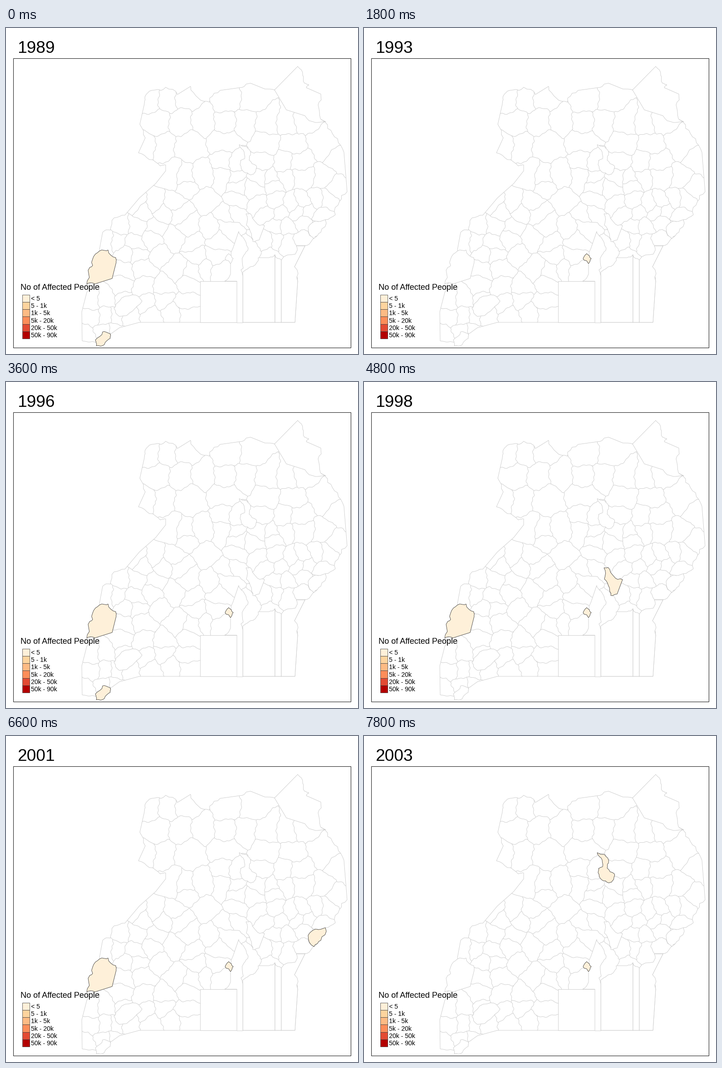
A matplotlib script that plays this animation: 776 by 721 pixels, repeating every 8000 ms.

```python
import numpy as np
import matplotlib.pyplot as plt
from itertools import combinations
from matplotlib.animation import FuncAnimation
from matplotlib.collections import LineCollection
from matplotlib.patches import Polygon, Rectangle

W, H, DPI = 776, 721, 100
PX = 72 / DPI
STEP, TICK, LOOP = 600, 200, 8000
GRAY, DARK = "#c6c6c6", "#303030"
PALETTE = ["#fef0d9", "#fdd49e", "#fdbb84", "#fc8d59", "#e34a33", "#b30000"]
LABELS = ["< 5", "5 - 1k", "1k - 5k", "5k - 20k", "20k - 50k", "50k - 90k"]
rng = np.random.default_rng(7)

plt.rcParams["font.family"] = "Liberation Sans"
fig = plt.figure(figsize=(W / DPI, H / DPI), dpi=DPI, facecolor="white")
ax = fig.add_axes([0, 0, 1, 1])
ax.set_xlim(0, W)
ax.set_ylim(H, 0)
ax.axis("off")


def crinkle(*flat, levels=2, amount=0.18):
    """Closed rough border; long or axis-aligned edges stay straight."""
    pts = np.array(flat + flat[:2], float).reshape(-1, 2)
    for _ in range(levels):
        out = [pts[0]]
        for a, b in zip(pts[:-1], pts[1:]):
            d = b - a
            if 4 < np.hypot(*d) < 34 and d.all():
                out.append((a + b) / 2 + rng.uniform(-amount, amount) * np.array([-d[1], d[0]]))
            out.append(b)
        pts = np.array(out)
    return pts


def area(*flat):
    return ax.add_patch(Polygon(crinkle(*flat), facecolor="white", edgecolor=GRAY,
                                linewidth=0.8 * PX, zorder=3))


def warp(p):
    """Bend a line with a smooth field so that borders wander."""
    x, y = p.T
    dx = 3 * np.sin(y / 9 + x / 31) + 1.2 * np.sin(y / 2.3 + x / 5)
    dy = 3 * np.sin(x / 8 - y / 27) + 1.2 * np.sin(x / 2.6 - y / 6)
    return p + np.column_stack([dx, dy])


def cell_borders(sites):
    """Edges between the nearest-site cells, one per pair of neighbours."""
    sq = (sites ** 2).sum(1)
    for i, j in combinations(range(len(sites)), 2):
        a, b = sites[i], sites[j]
        gap = np.hypot(*(b - a))
        if gap > 150:
            continue
        mid, u = (a + b) / 2, np.array([a[1] - b[1], b[0] - a[0]]) / gap
        rel = np.delete(sites, [i, j], 0) - a
        f = np.delete(sq, [i, j]) - sq[i] - 2 * rel @ mid
        c = 2 * rel @ u
        hi = min(100, (f / c)[c > 0].min(initial=100))
        lo = max(-100, (f / c)[c < 0].max(initial=-100))
        if lo < hi:
            t = np.linspace(lo, hi, max(2, int((hi - lo) / 3)))
            yield warp(mid + t[:, None] * u)


outline = crinkle(
    592, 137, 571, 135, 539, 122, 522, 131, 472, 138, 449, 155, 449, 164, 424, 155, 407, 129,
    378, 147, 352, 131, 329, 137, 313, 143, 306, 155, 305, 168, 295, 213, 307, 243, 292, 276,
    316, 291, 340, 305, 352, 303, 352, 316, 330, 344, 294, 376, 262, 414, 238, 420, 230, 447,
    213, 452, 206, 490, 215, 530, 190, 560, 178, 585, 167, 628, 168, 692, 198, 695, 215, 688,
    250, 663, 294, 651, 637, 651, 643, 560, 636, 528, 659, 482, 684, 462, 704, 424, 726, 413,
    735, 384, 752, 362, 745, 275, 731, 245, 709, 222, 704, 207, 650, 180)

# Rough district centres: row y, then the x values along it
ROWS = {
    157: (315, 353, 398, 495, 545),
    208: (335, 393, 438, 480, 525, 572, 620, 655),
    255: (312, 345, 410, 480, 575, 640, 690),
    298: (485, 505, 570, 605, 650, 735),
    328: (360, 393, 432, 478, 508, 562, 590, 615, 652, 700),
    352: (400, 515, 548, 588, 725),
    385: (285, 330, 372, 440, 515, 555, 595, 622, 650, 680, 712),
    410: (308, 347, 390, 490, 512, 568, 600, 642, 668, 690),
    438: (250, 288, 335, 400, 445, 490, 590, 620, 654, 688),
    472: (222, 245, 282, 328, 368, 412, 470, 575, 600, 622),
    502: (258, 290, 345, 422, 462, 545, 585),
    535: (265, 305, 370, 415, 440, 470),
    570: (255, 310, 345, 402),
    602: (190, 222, 262, 305, 350, 395),
    635: (185, 215, 240, 270, 320, 362, 400),
    672: (180, 215, 240),
}
sites = np.array([(x, y) for y, xs in ROWS.items() for x in xs], float)
sites += rng.uniform(-6, 6, sites.shape)

country = ax.add_patch(Polygon(outline, fill=False, edgecolor=GRAY, linewidth=0.8 * PX, zorder=2))
cells = LineCollection(list(cell_borders(sites)), colors=GRAY, linewidths=0.8 * PX, zorder=1)
ax.add_collection(cells)
cells.set_clip_path(country)

# Lake parts of the southern districts
area(428, 560, 509, 560, 509, 651, 428, 651)
area(522, 540, 545, 527, 556, 508, 580, 508, 593, 501, 593, 651, 522, 651)
area(593, 503, 607, 513, 607, 651, 593, 651)
area(607, 513, 638, 500, 640, 482, 659, 482, 636, 528, 643, 560, 637, 651, 607, 651)

# Districts that light up
districts = {}
districts["mountain"] = area(666, 441, 683, 427, 704, 424, 694, 452, 679, 466)
districts["south"] = area(238, 620, 250, 604, 279, 590, 300, 604, 279, 626, 250, 638)
districts["west"] = area(178, 567, 181, 536, 191, 525, 197, 500, 217, 492, 225, 491, 242, 508,
                         243, 518, 234, 554, 196, 566)
districts["southwest"] = area(199, 703, 197, 690, 213, 672, 229, 676, 230, 686, 217, 700)
districts["central"] = area(529, 411, 538, 410, 551, 430, 570, 437, 558, 469, 544, 472, 541, 455,
                            530, 436)
districts["northeast"] = area(592, 137, 643, 85, 654, 104, 658, 122, 668, 126, 662, 132, 694, 146,
                              688, 170, 693, 200, 705, 208, 682, 209, 659, 194, 618, 181)
districts["lake"] = area(500, 488, 513, 450, 522, 462, 534, 487, 524, 503, 523, 531, 518, 535,
                         522, 548, 522, 652, 509, 652, 509, 560, 482, 560, 495, 544, 495, 521)
districts["city"] = area(483, 510, 491, 499, 501, 510, 495, 521, 486, 514)
districts["east"] = area(632, 466, 636, 455, 650, 447, 665, 449, 678, 465, 663, 481, 640, 481)
districts["north"] = area(514, 258, 530, 262, 539, 281, 536, 292, 552, 305, 550, 318, 540, 325,
                          524, 318, 516, 302, 517, 293, 526, 289, 523, 270)

# One entry per step: year and lit districts
YEARS = [
    (1989, "west southwest"), (1990, "city"), (1992, "city southwest"), (1993, "city"),
    (1994, "west east"), (1995, "west city"), (1996, "west city southwest"), (1997, "city"),
    (1998, "west city central"), (1999, "west city south"), (2000, "west city"),
    (2001, "west city mountain"), (2002, "west city northeast lake east"), (2003, "city north"),
]


def label(x, y, text, size):
    return ax.text(x, y, text, fontsize=size * PX, color="black", va="baseline", zorder=6)


ax.add_patch(Rectangle((15.5, 66.5), 744.5, 640, fill=False, edgecolor="#202020",
                       linewidth=1.1 * PX, zorder=5))
label(31.8, 579.3, "No of Affected People", 18)
for i, (color, text) in enumerate(zip(PALETTE, LABELS)):
    y = 589.5 + i * 16.3
    ax.add_patch(Rectangle((35.5, y), 16, 16.3, facecolor=color, edgecolor="#404040",
                           linewidth=0.8 * PX, zorder=6))
    label(55, y + 13.3, text, 14)
title = label(25.4, 55, "", 37)


def draw(i):
    year, lit = YEARS[i * TICK // STEP]
    title.set_text(str(year))
    for name, patch in districts.items():
        on = name in lit.split()
        patch.set(facecolor=PALETTE[0] if on else "white", edgecolor=DARK if on else GRAY,
                  zorder=4 if on else 3)
    return [title, *districts.values()]


anim = FuncAnimation(fig, draw, frames=LOOP // TICK, interval=TICK, repeat=True, repeat_delay=0)
plt.show()
```
